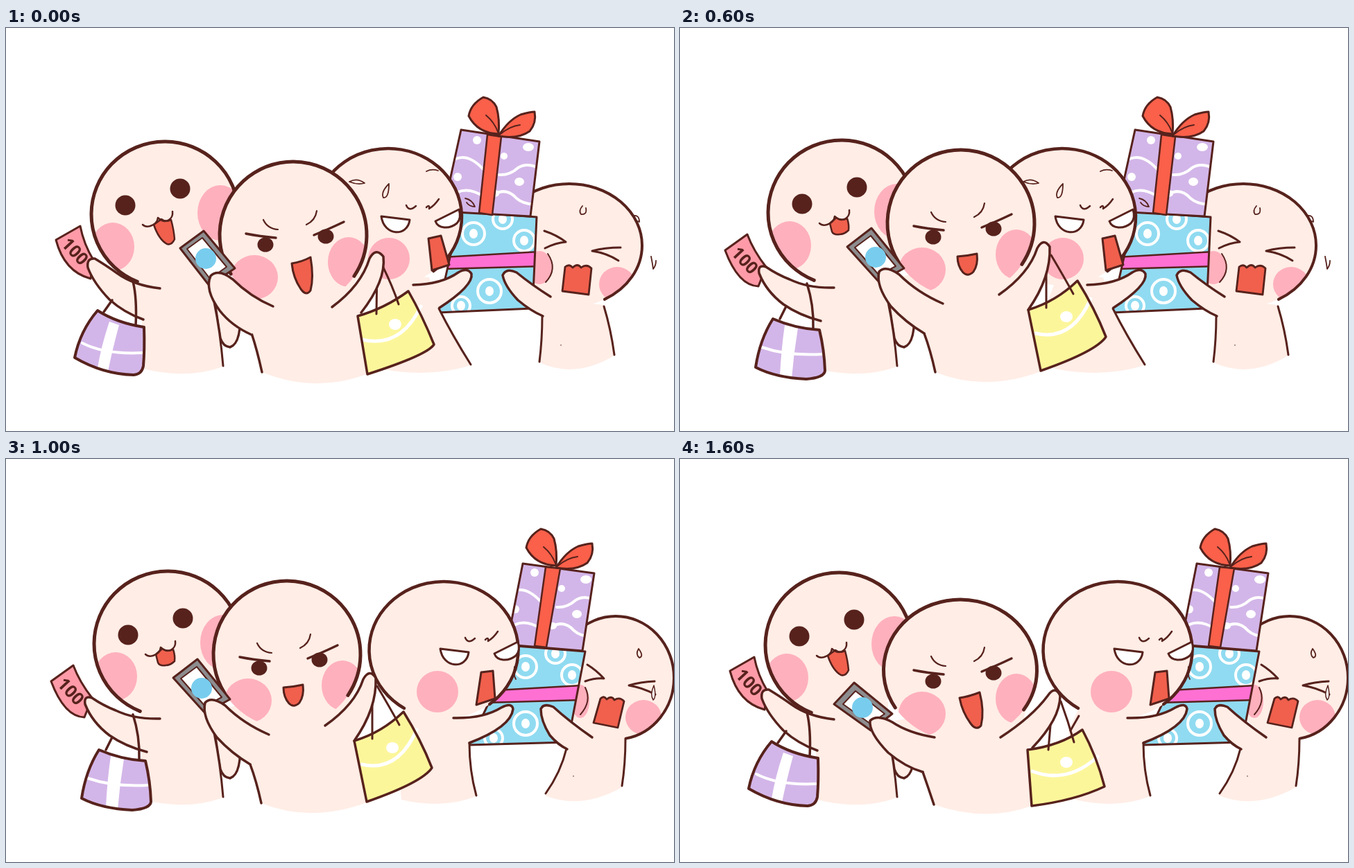
Write an HTML page with a canvas that moves like this. It is 963 by 582 pixels and loops after 1800 ms.

```html
<!DOCTYPE html>
<html lang="en">
<head>
<meta charset="utf-8">
<title>Shopping friends</title>
<style>
html, body { margin: 0; width: 100%; height: 100%; overflow: hidden; background: #fff; }
canvas { display: block; }
</style>
</head>
<body>
<canvas id="stage" width="963" height="582"></canvas>
<script>
const ctx = document.getElementById('stage').getContext('2d');
const INK = '#57221c', SKIN = '#ffede6', BLUSH = '#ffb0bd', RED = '#f0604d', BOW = '#fa604a',
      PURPLE = '#d3b6e9', BLUE = '#90dbf1', YELLOW = '#fcf69b', WHITE = '#fff';
const STEP = 200, STEPS = 9, RAD = Math.PI / 180;

function shape(d, fill, width = 0, color = INK) {
  const path = new Path2D(d);
  if (fill) { ctx.fillStyle = fill; ctx.fill(path); }
  if (width) { ctx.lineWidth = width; ctx.strokeStyle = color; ctx.stroke(path); }
}
const line = (d, width = 3, color = INK) => shape(d, null, width, color);

function oval(x, y, rx, ry = rx, fill = INK) {
  ctx.beginPath();
  ctx.ellipse(x, y, rx, ry, 0, 0, 2 * Math.PI);
  ctx.fillStyle = fill;
  ctx.fill();
}

function ring(x, y, r) {
  ctx.beginPath();
  ctx.arc(x, y, r, 0, 2 * Math.PI);
  ctx.lineWidth = 4;
  ctx.strokeStyle = WHITE;
  ctx.stroke();
  oval(x, y, 6, 7, WHITE);
}

// Filled head with blush spots kept inside and an open outline (degrees).
function head(x, y, rx, ry, from, to, width, spots) {
  oval(x, y, rx, ry, SKIN);
  ctx.save();
  ctx.clip();
  for (const s of spots) oval(...s, BLUSH);
  ctx.restore();
  ctx.beginPath();
  ctx.ellipse(x, y, rx, ry, 0, from * RAD, to * RAD);
  ctx.lineWidth = width;
  ctx.strokeStyle = INK;
  ctx.stroke();
}

function at(x, y, draw) {
  ctx.save();
  ctx.translate(x, y);
  draw();
  ctx.restore();
}

function inside(d, draw) {
  ctx.save();
  ctx.clip(new Path2D(d));
  draw();
  ctx.restore();
}

// Blends two paths that share one structure.
function mix(a, b, k) {
  const ends = b.match(/-?[\d.]+/g);
  let i = 0;
  return a.replace(/-?[\d.]+/g, v => +v + (ends[i++] - v) * k);
}
const lerp = (a, b, k) => a + (b - a) * k;

const cheerful = [{
  dx: 0, dy: 0,
  tongue: 'M213 284 Q220 279 224 276 Q231 281 238 277 Q242 292 243 305 Q239 314 232 312 Q220 305 213 284Z',
  note: 'M72 306 L107 286 Q112 312 126 335 L122 362 Q84 352 72 306Z', text: [99, 323],
  arm: 'M222 376 Q185 372 160 354 Q143 342 128 333 Q116 332 118 346 Q126 368 149 392 Q170 411 198 421',
  handles: 'M141 410 L153 393 M183 366 Q189 390 187 430',
  bag: 'M132 408 Q160 426 199 432 Q200 465 198 488 Q196 500 184 501 Q140 500 99 476 Q107 437 132 408Z',
  ribbon: 'M149 424 L163 429 Q153 466 147 496 L132 491 Q137 460 149 424Z',
  band: 'M110 455 Q143 472 198 469'
}, {
  dx: 4, dy: -2,
  tongue: 'M212 284 Q218 279 221 276 Q229 281 237 277 Q240 286 239 294 Q233 300 226 300 Q217 301 215 296Z',
  note: 'M65 321 L97 298 Q106 322 124 345 L113 373 Q84 372 65 321Z', text: [93, 336],
  arm: 'M222 375 Q185 376 158 363 Q140 356 124 345 Q112 341 114 354 Q124 380 149 399 Q172 415 203 423',
  handles: 'M144 420 L153 402 M183 369 Q193 400 192 433',
  bag: 'M134 420 Q166 434 201 436 Q208 465 209 495 Q208 505 182 507 Q138 505 109 490 Q115 450 134 420Z',
  ribbon: 'M151 429 L170 433 Q164 470 161 506 L144 502 Q146 463 151 429Z',
  band: 'M118 461 Q155 474 206 471'
}];

function drawCheerful(p) {
  shape('M337 400 Q341 455 323 461 Q313 460 309 448 L300 390Z', SKIN, 3.5);
  shape('M194 355 L300 350 L300 395 Q309 445 313 489 Q260 508 198 492Z', SKIN);
  line('M300 396 Q309 440 313 488');
  head(229 + p.dx, 269 + p.dy, 106, 105, 112, 385, 5, [
    [154 + p.dx, 316 + p.dy, 31, 35], [309 + p.dx, 267 + p.dy, 33, 40]]);
  at(p.dx, p.dy, () => {
    oval(172, 256, 14.5);
    oval(251, 232, 14.5);
    shape(p.tongue, RED, 2.5);
    line('M197 284 Q201 288 208 286 Q218 283 219 274 Q228 282 235 277 Q241 273 240 265', 2.5);
  });
  shape(p.note, '#ff9ba8', 3);
  ctx.save();
  ctx.translate(...p.text);
  ctx.rotate(47 * RAD);
  ctx.font = '600 25px "Noto Sans", sans-serif';
  ctx.textAlign = 'center';
  ctx.textBaseline = 'middle';
  ctx.fillStyle = INK;
  ctx.fillText('100', 0, 1);
  ctx.restore();
  shape(p.arm, SKIN, 3.5);
  line(p.handles, 3.5);
  shape(p.bag, PURPLE);
  shape(p.ribbon, WHITE);
  line(p.band, 4, WHITE);
  line(p.bag, 4);
}

const eager = [{
  head: [414, 299, 106, 106], face: [414, 298],
  mouth: 'M-2 42 Q12 40 25 33 Q30 62 25 81 Q19 90 11 79 Q0 63 -2 42Z',
  body: 'M354 441 Q362 465 369 497 Q445 528 520 500 L512 410 L502 370 L516 335 L327 365 L352 387Z',
  side: 'M354 441 Q362 465 369 497',
  phone: 'M251 318 L285 293 L330 347 L293 372Z', screen: 'M261 319 L283 303 L318 345 L294 362Z', dot: [288, 333],
  left: 'M385 402 Q352 388 327 363 Q306 347 295 358 Q286 378 308 408 Q325 430 354 443',
  right: 'M470 403 Q512 372 524 333 Q533 316 544 330 Q548 365 512 411',
  handles: 'M535 345 L534 413 M542 342 Q557 372 566 399',
  bag: 'M507 416 Q546 405 580 380 Q600 415 617 457 Q608 472 521 500Z',
  stripe: 'M513 450 Q569 463 598 402', spot: [561, 428]
}, {
  head: [404, 305, 110.5, 102], face: [405, 306],
  mouth: 'M-2 39 Q12 37 27 31 Q34 58 29 79 Q22 87 14 76 Q2 60 -2 39Z',
  body: 'M350 452 Q358 475 366 499 Q440 525 507 501 L503 415 L496 375 L500 350 L308 378 L335 394Z',
  side: 'M350 452 Q358 475 366 499',
  phone: 'M222 354 L251 323 L306 368 L275 392Z', screen: 'M235 354 L253 335 L295 368 L274 382Z', dot: [263, 359],
  left: 'M367 402 Q330 396 306 380 Q284 368 274 378 Q272 395 300 424 Q325 445 350 452',
  right: 'M462 402 Q508 372 530 342 Q541 326 548 342 Q548 375 508 417',
  handles: 'M537 350 L531 420 M549 350 Q560 380 568 409',
  bag: 'M501 420 Q548 414 580 391 Q601 430 612 473 Q570 493 507 501Z',
  stripe: 'M508 451 Q558 470 602 430', spot: [557, 438]
}, {
  head: [405, 282, 106, 106], face: [405, 287],
  mouth: 'M-5 43 Q10 42 23 39 Q25 55 18 65 Q10 73 3 66 Q-5 57 -5 43Z',
  body: 'M352 441 Q361 465 368 497 Q440 526 520 496 L502 407 L493 353 L508 325 L318 359 L345 382Z',
  side: 'M352 441 Q361 465 368 497',
  phone: 'M241 316 L276 289 L323 347 L287 367Z', screen: 'M252 317 L275 300 L311 344 L287 357Z', dot: [282, 331],
  left: 'M379 398 Q342 382 316 356 Q296 342 287 352 Q282 372 304 402 Q325 425 352 441',
  right: 'M460 385 Q503 355 515 318 Q524 302 533 316 Q535 360 502 407',
  handles: 'M528 330 L528 404 M535 328 Q554 360 567 384',
  bag: 'M502 407 Q542 395 573 365 Q598 405 614 446 Q600 467 520 495Z',
  stripe: 'M513 441 Q565 453 592 391', spot: [557, 417]
}];

function drawEager(p) {
  const [fx, fy] = p.face;
  shape(p.body, SKIN);
  line(p.side, 3.5);
  head(...p.head, 148, 394, 5, [[fx - 56, fy + 62, 34, 32], [fx + 80, fy + 40, 30, 36]]);
  at(fx, fy, () => {
    oval(-40, 15, 11.5, 10.5);
    oval(47, 3, 11.5, 10.5);
    line('M-68 -1 Q-48 3 -25 5 M30 1 Q50 -7 73 -18', 3.5);
    line('M-43 -21 Q-37 -8 -22 -7 M34 -34 Q32 -20 19 -14', 2.2);
    shape(p.mouth, RED, 3);
  });
  shape(p.phone, '#8d8c8e', 3);
  shape(p.screen, WHITE, 2);
  oval(...p.dot, 15, 15, '#78cdee');
  shape(p.left, SKIN, 3.5);
  shape(p.bag, YELLOW);
  line(p.stripe, 5, WHITE);
  oval(...p.spot, 9, 8, WHITE);
  line(p.bag, 3.5);
  line(p.handles);
  shape(p.right, SKIN, 3.5);
}

function drawStruggler(k) {
  const m = (a, b) => mix(a, b, k);
  shape(m('M773 390 L773 416 Q772 450 769 483 Q820 507 877 473 Q873 435 862 400Z',
          'M808 390 L808 418 Q800 452 777 486 Q830 507 888 474 Q892 440 893 400Z'), SKIN);
  line(m('M773 416 Q773 450 769 482 M862 402 Q872 435 877 472',
         'M808 418 Q800 452 778 483 M893 404 Q893 440 888 472'));
  oval(lerp(800, 818, k), 458, 0.8);
  head(lerp(812, 879, k), lerp(314, 316, k), lerp(105, 84, k), 89, 180, lerp(421, 440, k), 4, [
    [lerp(769, 828, k), lerp(346, 350, k), lerp(18, 13, k), 24],
    [lerp(881, 919, k), lerp(370, 373, k), 26, 25]]);
  line(m('M776 293 Q794 299 807 309 Q793 310 777 318 M886 317 Q863 317 845 322 Q866 325 883 336',
         'M838 297 Q851 305 862 317 Q849 316 835 321 M935 321 Q914 322 898 327 Q917 330 936 340'), 3);
  line(m('M781 326 Q796 348 778 367', 'M835 330 Q845 350 828 369'), 2);
  shape(m('M806 345 Q812 340 817 346 Q824 339 829 346 Q837 340 844 347 L840 385 L802 380Z',
          'M857 346 Q862 341 866 347 Q873 341 877 348 Q885 343 891 350 L882 388 L847 381Z'), RED, 2.8);
}

function drawGifts(k) {
  const m = (a, b) => mix(a, b, k);
  const dx = 83 * k, dy = 2 * k;
  const lower = m('M655 265 L765 273 L759 405 L622 411Z', 'M735 270 L835 278 L810 409 L667 413Z');
  const upper = m('M656 147 L769 164 L756 272 L630 265Z', 'M745 151 L848 165 L831 277 L722 268Z');
  shape(lower, BLUE);
  inside(lower, () => {
    ring(lerp(674, 749, k), lerp(297, 300, k), 16);
    ring(lerp(716, 792, k), lerp(276, 281, k), 14);
    ring(lerp(747, 816, k), lerp(307, 312, k), 15);
    ring(lerp(697, 749, k), lerp(380, 382, k), 17);
    ring(lerp(656, 703, k), lerp(401, 403, k), 13);
    shape(m('M630 331 L770 323 L770 344 L630 348Z', 'M690 335 L830 327 L830 348 L690 352Z'), '#ff70d3', 2.5);
  });
  line(lower, 3);
  shape(upper, PURPLE);
  inside(upper, () => at(dx, dy, () => {
    oval(679, 162, 6, 6, WHITE);
    oval(718, 185, 5, 5, WHITE);
    oval(753, 172, 8, 6, WHITE);
    oval(651, 215, 6, 6, WHITE);
    oval(740, 222, 7, 6, WHITE);
    oval(705, 239, 6, 5, WHITE);
    line('M642 193 Q663 177 688 204 M711 212 Q726 213 738 202 Q750 194 768 202 M640 245 Q660 225 688 243 M704 240 Q722 230 736 246 Q745 254 762 255', 4, WHITE);
  }));
  line(upper, 3);
  shape(m('M694 154 L714 157 L701 270 L682 267Z', 'M778 156 L799 158 L779 272 L762 270Z'), BOW, 2.5);
  at(dx, dy / 2, () => {
    shape('M710 153 Q680 152 667 127 Q670 110 688 100 Q701 102 707 114 Q712 132 710 153Z', BOW, 3);
    shape('M710 156 Q724 133 742 125 Q756 121 762 121 Q765 137 755 149 Q738 161 710 156Z', BOW, 3);
    line('M709 150 Q704 136 692 126 M713 153 Q726 142 741 140', 2);
  });
}

function drawGrip(k) {
  shape(mix('M785 388 Q758 371 736 353 Q721 346 716 357 Q719 373 738 393 Q757 409 774 416',
            'M845 402 Q812 379 789 358 Q775 352 771 361 Q771 378 784 399 Q796 413 809 419', k), SKIN, 3.5);
}

function drawGrumpy(k) {
  const m = (a, b) => mix(a, b, k);
  shape(m('M545 355 L532 390 L540 492 Q610 506 670 487 Q642 440 624 404 L610 360Z',
          'M575 360 L560 392 L570 492 Q630 506 678 487 Q670 450 668 410 L660 360Z'), SKIN);
  line(m('M624 405 Q643 443 670 486', 'M668 410 Q668 450 678 486'));
  if (k > 0.5) line(m('M500 372 L490 392', 'M575 371 L563 392'));
  head(lerp(551, 631, k), lerp(273, 276, k), lerp(106, 107.5, k), 99, 122, 412, 4.5,
    [[lerp(552, 622, k), lerp(333, 336, k), 30, 30]]);
  at(-85 * (1 - k), -2 * (1 - k), () => {
    shape('M626 274 L667 279 C664 304 630 303 626 274Z', WHITE, 3);
    shape('M704 281 L738 264 Q742 277 735 284 C724 293 708 292 704 281Z', WHITE, 3);
    line('M662 258 Q666 268 676 259 M691 261 Q696 256 695 263 Q703 258 709 249', 2.5);
  });
  shape(m('M609 304 L627 300 L639 342 L614 350Z', 'M685 308 L702 306 L705 346 L678 355Z'), RED, 3);
  shape(m('M587 371 Q628 370 652 353 Q665 345 671 355 Q674 372 625 404',
          'M645 374 Q688 375 714 359 Q729 351 731 361 Q728 387 668 410'), SKIN, 3.5);
}

function drawSweat(k) {
  if (k === 0) {
    line('M495 222 Q506 216 517 224 Q507 227 495 222 M552 225 Q540 237 544 245 Q552 246 552 225 M606 207 Q614 203 623 206 M662 246 Q672 248 676 258 Q668 258 664 252', 1.8);
    line('M831 257 Q825 264 829 269 Q838 270 836 260 M905 271 Q913 270 913 280 L908 278 M930 330 Q932 340 933 348 Q937 343 937 336', 1.8);
  } else {
    line('M912 274 Q907 282 913 287 Q920 285 912 274Z', 1.8);
    shape('M934 327 Q928 340 933 348 Q938 344 934 327Z', WHITE, 1.5);
    line(mix('M648 297 Q650 311 651 317', 'M733 300 Q731 312 735 318', k), 1.8);
  }
}

function render(now) {
  const step = Math.floor(now / STEP) % STEPS;
  const sway = [0, 0.7, 1][step % 3];
  const shove = step % 3 ? 1 : 0;
  const odd = step % 2;
  ctx.fillStyle = WHITE;
  ctx.fillRect(0, 0, 963, 582);
  ctx.lineCap = ctx.lineJoin = 'round';
  drawStruggler(shove);
  drawGifts(sway);
  drawGrip(shove);
  drawGrumpy(sway);
  drawSweat(sway);
  drawCheerful(cheerful[odd]);
  drawEager(eager[step === 0 ? 0 : odd ? 2 : 1]);
}

const start = performance.now();
function loop() {
  render(performance.now() - start);
  requestAnimationFrame(loop);
}
loop();
</script>
</body>
</html>
```
